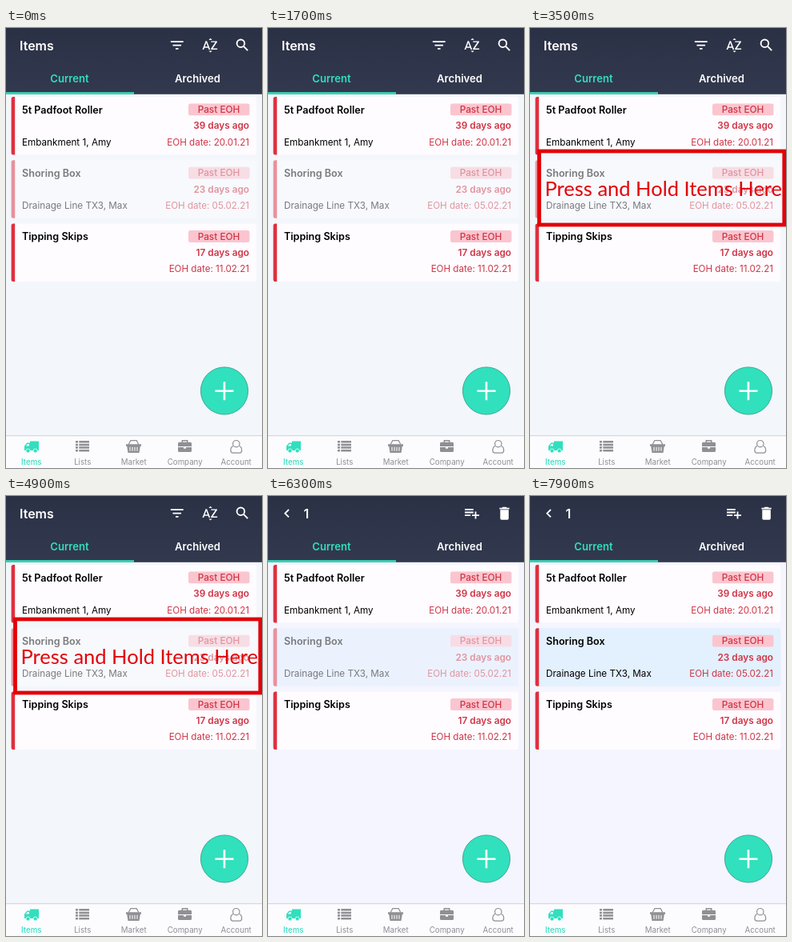
An HTML page that plays this animation: 320 by 550 pixels, repeating every 8000 ms.

```html
<!DOCTYPE html>
<html lang="en">
<head>
<meta charset="utf-8">
<style>
html, body { margin: 0; width: 100%; height: 100%; overflow: hidden; }
svg { display: block; width: 320px; height: 550px; font-family: Inter, sans-serif; }
.b { font-weight: 600; }
.mid { text-anchor: middle; }
.end { text-anchor: end; }
</style>
</head>
<body>
<svg viewBox="0 0 320 550">
  <defs>
    <linearGradient id="bar" x2="0" y2="1">
      <stop stop-color="#2b3145"/><stop offset="1" stop-color="#32394e"/>
    </linearGradient>
  </defs>
  <rect id="page" width="320" height="550" fill="#f3f6fb"/>
  <rect width="320" height="82.8" fill="url(#bar)"/>
  <rect y="80.2" width="160" height="2.6" fill="#31dfbe"/>
  <g class="b mid" font-size="13.1">
    <text x="79.5" y="67.8" fill="#31dfbe">Current</text>
    <text x="239.5" y="67.8" fill="#fff">Archived</text>
  </g>

  <g id="browse" fill="#fff">
    <text class="b" x="17" y="28" font-size="16">Items</text>
    <path transform="translate(203.2 11) scale(.88)" d="M10 18h4v-2h-4zM3 6v2h18V6zm3 7h12v-2H6z"/>
    <path transform="translate(244 10.6) scale(.92)" d="M14.94 4.66h-4.72l2.36-2.36zm-4.69 14.71h4.66l-2.33 2.33zM6.1 6.27L1.6 17.73h1.84l.92-2.45h5.11l.92 2.45h1.84L7.74 6.27zm-1.13 7.37l1.94-5.18 1.94 5.18zm10.76 2.5h6.12v1.59h-8.53v-1.29l5.92-8.56h-5.88v-1.6h8.3v1.26z"/>
    <g fill="none" stroke="#fff" stroke-width="1.9"><circle cx="293.4" cy="19.3" r="4.8"/><path d="M296.8 22.7l5.4 5.4"/></g>
  </g>
  <g id="select" fill="#fff">
    <path d="M26 17l-4.7 4.7 4.7 4.7" fill="none" stroke="#fff" stroke-width="1.8"/>
    <text class="b" x="44.5" y="28" font-size="16">1</text>
    <path transform="translate(244.2 10.6) scale(.9)" d="M14 10H2v2h12zm0-4H2v2h12zm4 8v-4h-2v4h-4v2h4v4h2v-4h4v-2zM2 16h8v-2H2z"/>
    <path transform="translate(285 11.2) scale(.88)" d="M6 19c0 1.1.9 2 2 2h8c1.1 0 2-.9 2-2V7H6zM19 4h-3.5l-1-1h-5l-1 1H5v2h14z"/>
  </g>

  <g id="cards"></g>

  <circle cx="273" cy="453.5" r="29.6" fill="#31e0bd" stroke="#36a28f" stroke-width=".9"/>
  <path d="M261.5 453.8h23M273 442.3v23" stroke="#fff" stroke-width="2.6"/>

  <rect y="509.5" width="320" height="40.5" fill="#fcfbfe"/>
  <path d="M0 509.7h320" stroke="#c6c7cc" stroke-width=".8"/>
  <g fill="#8f8f94">
    <g fill="#31dfbe">
      <path d="M30 516.5h11v11.5H23v-5.5l3.3-4H30z"/>
      <path d="M24.8 522.5l2-2.5h2v2.5z" fill="#fcfbfe"/>
      <g stroke="#fcfbfe" stroke-width=".8"><circle cx="27.5" cy="528.5" r="2.5"/><circle cx="36.7" cy="528.5" r="2.5"/></g>
    </g>
    <path d="M87 516h3v2.5h-3zm0 3.7h3v2.5h-3zm0 3.6h3v2.5h-3zm0 3.7h3v2.5h-3zM91.3 516H104v2.5H91.3zm0 3.7H104v2.5H91.3zm0 3.6H104v2.5H91.3zm0 3.7H104v2.5H91.3z"/>
    <path d="M150 520.3h19v2.4h-1.2l-1.3 8.3h-14l-1.3-8.3H150z"/>
    <path d="M153.2 520.5l2.6-4.8h7.4l2.6 4.8" fill="none" stroke="#8f8f94" stroke-width="1.2"/>
    <path d="M155 523.7v5M158 523.7v5M161 523.7v5M164 523.7v5" stroke="#fcfbfe" stroke-width="1.1"/>
    <path d="M216.5 517.8h14q1.5 0 1.5 1.5v3.7h-17v-3.7q0-1.5 1.5-1.5zM215 524h7v1.7h3V524h7v4.5q0 1.5-1.5 1.5h-14q-1.5 0-1.5-1.5z"/>
    <path d="M220.3 518v-2.2h6.4v2.2" fill="none" stroke="#8f8f94" stroke-width="1.5"/>
    <g fill="none" stroke="#8f8f94" stroke-width="1.2">
      <circle cx="287.8" cy="519.7" r="4.2"/>
      <path d="M284.2 522.5c-2.4.7-3.3 3-3.3 5.5 0 2 1 3.2 2.8 3.2h8.2c1.8 0 2.8-1.2 2.8-3.2 0-2.5-.9-4.8-3.3-5.5"/>
    </g>
    <g class="mid" font-size="9.7">
      <text x="31.8" y="546.1" fill="#31dfbe" font-weight="500">Items</text>
      <text x="95.7" y="546.1">Lists</text>
      <text x="159.7" y="546.1">Market</text>
      <text x="223.7" y="546.1">Company</text>
      <text x="287.7" y="546.1">Account</text>
    </g>
  </g>

  <g id="hint">
    <rect x="11.5" y="154" width="306.3" height="92" fill="none" stroke="#e20208" stroke-width="4.8"/>
    <text x="18.5" y="210" font-size="25.5" font-family="Lato, sans-serif" fill="#e20208">Press and Hold Items Here</text>
  </g>
</svg>
<script>
const $ = id => document.getElementById(id);
const HINT_ON = 1900, SELECT = 6100, RELEASE = 6900, FADE = 250, LOOP = 8000;

const card = (y, title, place, days, date) => `
  <g transform="translate(0 ${y})">
    <rect x="6.6" width="306.6" height="72.5" rx="3" fill="#fefcff"/>
    <path d="M11.2 0v72.5H9.1q-2.500 0-2.500-2.500V2.500Q6.600 0 9.100 0z" fill="#de303f"/>
    <text class="b" x="20" y="20.800" font-size="12.600">${title}</text>
    <text x="20" y="60.900" font-size="11.700">${place}</text>
    <rect x="228" y="8.500" width="76.500" height="14.800" rx="2.500" fill="#fbc5cf"/>
    <g fill="#cf3545">
      <text class="mid" x="266" y="20.200" font-size="11.800" font-weight="500">Past EOH</text>
      <text class="end b" x="304" y="40.300" font-size="11.800">${days} days ago</text>
      <text class="end" x="304" y="60.900" font-size="11.600">EOH date: ${date}</text>
    </g>
  </g>`;

$("cards").innerHTML =
  card(86, "5t Padfoot Roller", "Embankment 1, Amy", 39, "20.01.21") +
  card(165.3, "Shoring Box", "Drainage Line TX3, Max", 23, "05.02.21") +
  card(244.6, "Tipping Skips", "", 17, "11.02.21");
const held = $("cards").children[1];
const show = (id, on) => $(id).style.display = on ? "" : "none";

function draw(now) {
  const t = now % LOOP, picked = t >= SELECT;
  const k = Math.min(1, Math.max(0, (t - RELEASE) / FADE));
  show("browse", !picked);
  show("select", picked);
  show("hint", t >= HINT_ON && !picked);
  $("page").setAttribute("fill", picked ? "#f4f5fe" : "#f3f6fb");
  held.children[0].setAttribute("fill", picked ? "#e3f0fe" : "#fefcff");
  held.setAttribute("opacity", 0.5 + 0.5 * k * k * (3 - 2 * k));
  requestAnimationFrame(draw);
}
draw(0);
</script>
</body>
</html>
```
